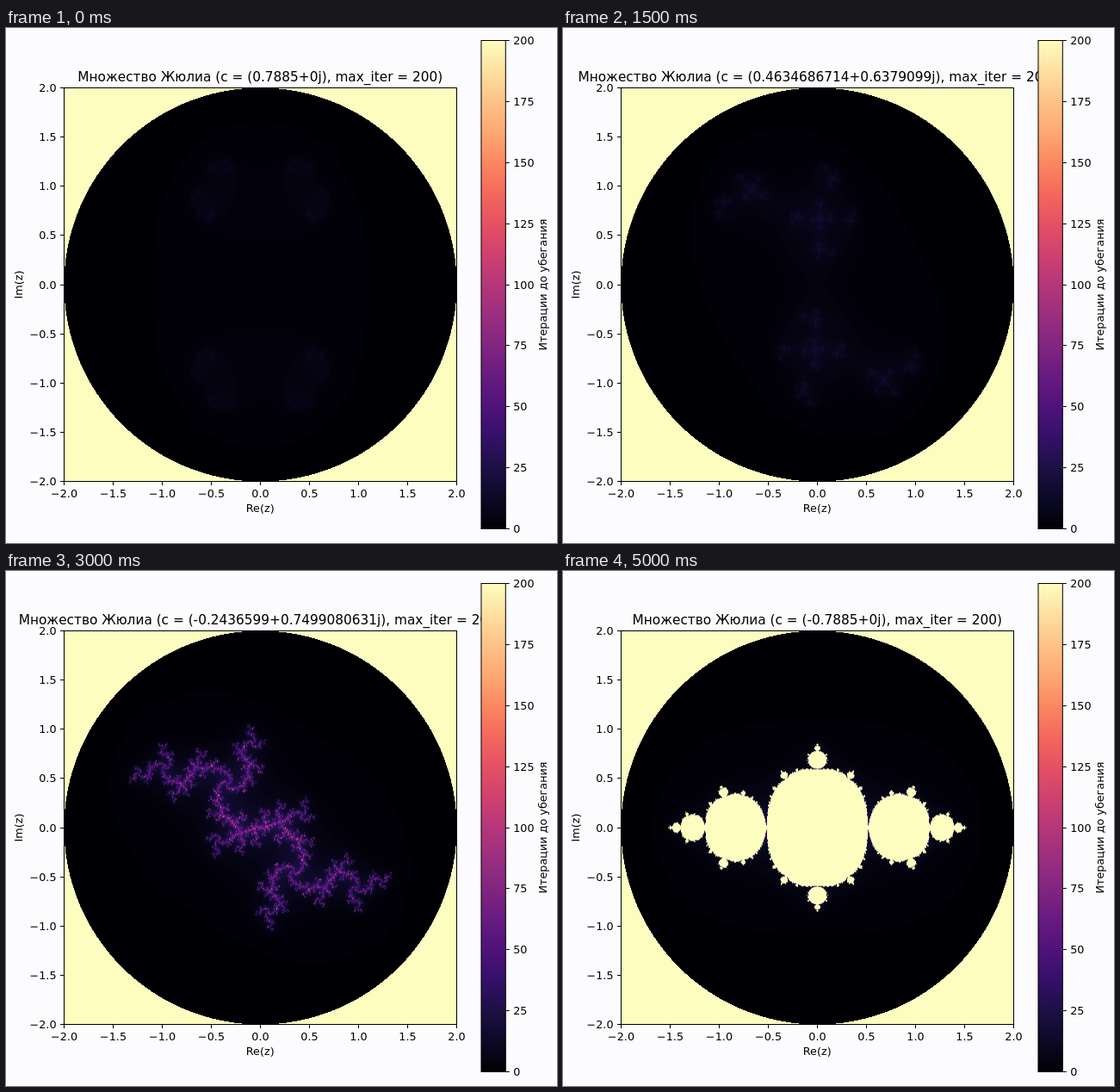
These frames come from a looping animation (640 by 598 pixels, 5100 ms). An HTML page with a canvas:

```html
<!DOCTYPE html>
<html lang="ru">
<head>
<meta charset="utf-8">
<title>Множество Жюлиа</title>
<style>
  html, body { margin: 0; width: 100%; height: 100%; overflow: hidden; background: #fcfcff; }
  canvas { display: block; width: 640px; height: 598px; }
</style>
</head>
<body>
<canvas id="stage" width="640" height="598"></canvas>
<script>
const W = 640, H = 598;
const STEP = 100, STEPS = 51;
const RADIUS = 0.7885, MAX_ITER = 200;
const N = 457;
const PAD = 9.2;
const PAPER = '#fcfcff';
const AX = { x: 67.5, y: 69.5, w: 456, h: 457 };
const BAR = { x: 552, y: 14.5, w: 28.3, h: 567 };
const FONT = '"DejaVu Sans", sans-serif';
const SMALL = `12.78px ${FONT}`, LARGE = `15.33px ${FONT}`;

const g = document.getElementById('stage').getContext('2d');
const plane = document.createElement('canvas');
plane.width = plane.height = N;
const planeCtx = plane.getContext('2d');
const pixels = planeCtx.createImageData(N, N);
const words = new Uint32Array(pixels.data.buffer);

// Magma colour map, evenly spaced stops
const stops = ('000004 0c0926 1c1044 341069 4f127b 671b80 812581 9c2e7f b5367a ' +
  'd0416f e55064 f4695c fb8761 fea873 fec287 fde0a1 fcfdbf').split(' ')
  .map(h => [0, 2, 4].map(i => parseInt(h.slice(i, i + 2), 16)));

function magma(t) {
  const p = t * (stops.length - 1);
  const i = Math.min(Math.floor(p), stops.length - 2);
  return stops[i].map((v, k) => Math.round(v + (stops[i + 1][k] - v) * (p - i)));
}

const lut = Array.from({ length: MAX_ITER + 1 }, (_, i) => {
  const [r, gr, b] = magma(i / MAX_ITER);
  return (255 << 24 | b << 16 | gr << 8 | r) >>> 0;
});

function escapeTime(x, y, cr, ci) {
  if (x * x + y * y > 4) return MAX_ITER;
  for (let i = 0; i < MAX_ITER; i++) {
    const nx = x * x - y * y + cr;
    y = 2 * x * y + ci;
    x = nx;
    if (x * x + y * y > 4) return i;
  }
  return MAX_ITER;
}

// The set is symmetric under z -> -z, so half the rows are enough
function fillPlane(cr, ci) {
  const last = N * N - 1, d = 4 / (N - 1);
  for (let n = 0; n <= last / 2; n++) {
    const x = -2 + d * (n % N), y = 2 - d * Math.floor(n / N);
    words[n] = words[last - n] = lut[escapeTime(x, y, cr, ci)];
  }
  planeCtx.putImageData(pixels, 0, 0);
}

function decimal(v) {
  const s = Number((Math.abs(v) - 3e-11).toFixed(10));
  return (v < 0 && s ? '-' : '') + s;
}

function complexText(re, im) {
  const a = decimal(re), b = decimal(im);
  return a === '0' ? `${b}j` : `(${a}+${b}j)`;
}

function text(str, x, y, align = 'center', turn = 0) {
  g.save();
  g.translate(x, y);
  g.rotate(turn);
  g.textAlign = align;
  g.fillText(str, 0, 0);
  g.restore();
}

function line(x1, y1, x2, y2) {
  g.beginPath();
  g.moveTo(x1, y1);
  g.lineTo(x2, y2);
  g.stroke();
}

function drawAxes() {
  g.drawImage(plane, AX.x - 0.5, AX.y - 0.5, AX.w + 1, AX.h + 1);
  g.strokeRect(AX.x, AX.y, AX.w, AX.h);
  const bottom = AX.y + AX.h;
  g.font = SMALL;
  for (let k = 0; k <= 8; k++) {
    const v = -2 + k / 2;
    const label = v.toFixed(1).replace('-', '\u2212');
    const x = AX.x + AX.w * k / 8;
    const y = Math.round(bottom - AX.h * k / 8 - 0.5) + 0.5;
    line(x, bottom, x, bottom + 4.5);
    text(label, x, 545.2);
    line(AX.x, y, AX.x - 4.5, y);
    text(label, AX.x - 9, y + 4.6, 'right');
  }
  text('Re(z)', 295.2, 562.3);
  text('Im(z)', 19, 298, 'center', -Math.PI / 2);
}

function drawBar() {
  const bottom = BAR.y + BAR.h, right = BAR.x + BAR.w;
  const fill = g.createLinearGradient(0, bottom, 0, BAR.y);
  stops.forEach((c, i) => fill.addColorStop(i / (stops.length - 1), `rgb(${c})`));
  g.fillStyle = fill;
  g.fillRect(BAR.x, BAR.y, BAR.w, BAR.h);
  g.strokeRect(BAR.x, BAR.y, BAR.w, BAR.h);
  g.fillStyle = '#000';
  g.font = SMALL;
  for (let v = 0; v <= MAX_ITER; v += 25) {
    const y = Math.round(bottom - BAR.h * v / MAX_ITER - 0.5) + 0.5;
    line(right, y, right + 4.5, y);
    text(String(v), right + 8.9, y + 4.6, 'left');
  }
  text('Итерации до убегания', 628, 298, 'center', -Math.PI / 2);
}

function draw(k) {
  const angle = Math.PI * k / (STEPS - 1);
  const re = RADIUS * Math.cos(angle), im = RADIUS * Math.sin(angle);
  fillPlane(re, im);

  g.setTransform(1, 0, 0, 1, 0, 0);
  g.fillStyle = PAPER;
  g.fillRect(0, 0, W, H);
  g.fillStyle = g.strokeStyle = '#000';
  g.lineWidth = 1.02;

  // A long title widens the figure, which is then squeezed back to the stage
  const title = `Множество Жюлиа (c = ${complexText(re, im)}, max_iter = ${MAX_ITER})`;
  const mid = 295.3;
  g.font = LARGE;
  const extra = Math.max(0, PAD - mid + g.measureText(title).width / 2);
  const sx = W / (W + extra);
  g.setTransform(sx, 0, 0, 1, extra * sx, 0);

  drawAxes();
  g.font = LARGE;
  text(title, mid, 61.8);
  drawBar();
}

let shown = -1;
const start = performance.now();

function tick() {
  const k = Math.floor((performance.now() - start) / STEP) % STEPS;
  if (k !== shown) draw(shown = k);
  requestAnimationFrame(tick);
}
tick();
</script>
</body>
</html>
```
